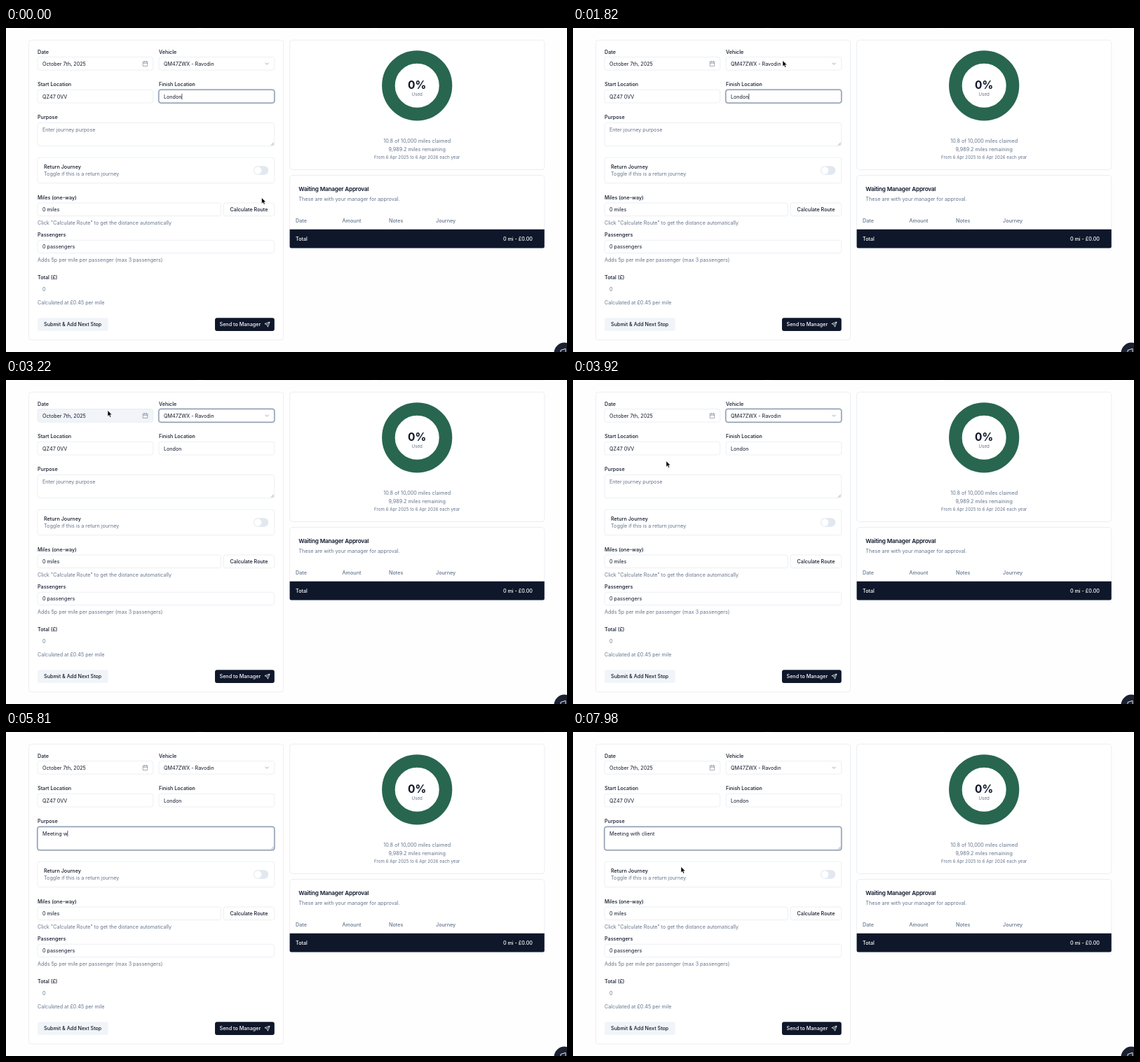
Recreate the animation shown at these times as an HTML page. Size 800x463 px, loop 8 s.

```html
<!DOCTYPE html>
<html lang="en">
<head>
<meta charset="utf-8">
<title>Journey form</title>
<style>
  html, body { margin: 0; width: 100%; height: 100%; overflow: hidden; background: #fefefe; }
  svg { display: block; width: 100vw; height: 100vh; }
  text { font: 400 7.2px Inter, "Liberation Sans", sans-serif; fill: #0f172a; white-space: pre; }
  .medium { font-weight: 500; }
  .muted { fill: #64748b; }
  .small { font-size: 6.2px; }
  .title { font-size: 8.2px; font-weight: 600; letter-spacing: -.025em; }
  .big { font-size: 15.5px; font-weight: 700; }
  .white { fill: #fff; }
  .middle { text-anchor: middle; }
  .end { text-anchor: end; }
  .box { fill: #fff; stroke: #e2e8f0; stroke-width: .7; }
  .icon { fill: none; stroke: #7b8798; stroke-width: .7; stroke-linecap: round; stroke-linejoin: round; }
</style>
</head>
<body>
<svg id="stage" viewBox="0 0 800 463" xmlns="http://www.w3.org/2000/svg"></svg>
<script>
const LOOP = 8000;
const VEHICLE = "QM47ZWX - Ravodin";
const stage = document.getElementById("stage");

// y is the vertical centre of the capitals
const text = (x, y, string, cls = "", id = "") =>
  `<text x="${x}" y="${y + 2.6}" class="${cls}" id="${id}">${string}</text>`;
const rect = (x, y, right, bottom, radius, attrs = 'class="box"') =>
  `<rect x="${x}" y="${y}" width="${right - x}" height="${bottom - y}" rx="${radius}" ${attrs}/>`;
const field = (x, y, right, bottom, id = "") =>
  rect(x, y, right, bottom, 3, `class="box" id="${id}"`);
const path = (d, attrs = 'class="icon"') => `<path d="${d}" ${attrs}/>`;
const focusRing = (id, x, y, right, bottom) => `<g id="${id}" fill="none">
  ${rect(x - .2, y - .2, right + .2, bottom + .2, 3.2, 'stroke="#c9d1dd" stroke-width="2.2"')}
  ${rect(x - .2, y - .2, right + .2, bottom + .2, 3.2, 'stroke="#8491a6" stroke-width=".9"')}</g>`;

const topEdges = [[32, 272], [282, 520], [530, 768]]
  .map(([a, b]) => path(`M${a} .3H${b}`, 'stroke="#e8ecf1" stroke-width=".7"')).join("");

const form = [
  rect(32.5, 17.3, 395.5, 445.8, 4),
  text(45, 34, "Date", "medium"),
  field(45, 41.5, 209.7, 60.2, "dateField"),
  text(52, 51, "October 7th, 2025"),
  path("M195.6 48.2h6.2v6.2h-6.2zM195.6 50.3h6.2M197.2 47.2v1.8M200.2 47.2v1.8"),
  text(218, 34, "Vehicle", "medium"),
  field(218, 41.5, 382.7, 60.2),
  text(225, 51, VEHICLE),
  path("M370 50l2.1 2.1 2.1-2.1"),
  text(45, 80.7, "Start Location", "medium"),
  field(45, 88.3, 209.7, 107),
  text(52, 98, "QZ47 0VV"),
  text(218, 80.7, "Finish Location", "medium"),
  field(218, 88.3, 382.7, 107),
  text(225, 98, "London", "", "finish"),
  text(45, 127.6, "Purpose", "medium"),
  field(45, 135.5, 382.7, 168.7),
  text(52, 145.3, "Enter journey purpose", "muted", "placeholder"),
  text(52, 145.3, "", "", "purpose"),
  path("M378.3 167.3l3.2-3.2M380.2 167.3l1.3-1.3"),
  field(45, 185.2, 382.7, 221.6),
  text(54, 198, "Return Journey", "medium"),
  text(54, 208, "Toggle if this is a return journey", "muted"),
  rect(353, 197.3, 374.3, 209.7, 6.2, 'fill="#e2e8f0"'),
  '<circle cx="359.2" cy="203.5" r="5.2" fill="#fff"/>',
  text(45, 242, "Miles (one-way)", "medium"),
  field(45, 250, 306.3, 268.6),
  text(52, 259.5, "0 miles"),
  field(310.2, 250, 382.7, 268.6),
  text(346.5, 259.5, "Calculate Route", "medium middle"),
  text(45, 278.3, 'Click "Calculate Route" to get the distance automatically', "muted"),
  text(45, 295.5, "Passengers", "medium"),
  field(45, 303.3, 382.7, 321.6),
  text(52, 312.5, "0 passengers"),
  text(45, 331, "Adds 5p per mile per passenger (max 3 passengers)", "muted"),
  text(45, 356.7, "Total (£)", "medium"),
  text(52, 373.8, "0", "muted"),
  text(45, 392.7, "Calculated at £0.45 per mile", "muted"),
  rect(45, 414.3, 145.8, 433, 3, 'fill="#f1f5f9"'),
  text(95.2, 423.8, "Submit &amp; Add Next Stop", "medium middle"),
  rect(298, 414.3, 382.8, 433, 3, 'fill="#0f172a"'),
  text(304.5, 423.8, "Send to Manager", "medium white"),
  path("M376.1 420l-7.2 2.6 3.2 1.4 1.4 3.2zM376.1 420l-4 4",
    'fill="none" stroke="#fff" stroke-width=".75" stroke-linejoin="round"')
].join("");

const summary = [
  rect(404.6, 17.3, 767.8, 202.5, 4),
  '<circle cx="586.2" cy="82.3" r="40.8" fill="none" stroke="#286650" stroke-width="18.6"/>',
  '<text x="586.2" y="87.2" class="big middle">0%</text>',
  text(586.2, 94.8, "Used", "small muted middle"),
  text(586.2, 161.3, "10.8 of 10,000 miles claimed", "muted middle"),
  text(586.2, 173.8, "9,989.2 miles remaining", "muted middle"),
  text(586.2, 184.7, "From 6 Apr 2025 to 6 Apr 2026 each year", "small muted middle"),
  rect(404.6, 210.5, 767.8, 314.6, 4),
  text(417.3, 230.2, "Waiting Manager Approval", "title"),
  text(417.3, 244.6, "These are with your manager for approval.", "muted"),
  ...[["Date", 413], ["Amount", 479.5], ["Notes", 546], ["Journey", 613]]
    .map(([name, x]) => text(x, 275, name, "muted medium")),
  path("M404.6 287.8H767.8V312.6a2 2 0 0 1-2 2H406.6a2 2 0 0 1-2-2z", 'fill="#0f172a"'),
  text(413, 301.2, "Total", "medium white"),
  text(751, 301.2, "0 mi - £0.00", "medium white end"),
  '<circle cx="796.5" cy="464.5" r="15" fill="#1b2131"/>',
  path("M791 460.5l7-2.2v6M791 460.5v4", 'fill="none" stroke="#fff" stroke-width=".9"')
].join("");

const overlay = `
  ${focusRing("finishFocus", 218, 88.3, 382.7, 107)}
  ${focusRing("vehicleFocus", 218, 41.5, 382.7, 60.2)}
  ${focusRing("purposeFocus", 45, 135.5, 382.7, 168.7)}
  ${path("", 'id="caret" stroke="#0f172a" stroke-width=".7"')}
  <g id="menu">
    ${rect(218, 63.4, 384, 86, 3, 'fill="#64748b" opacity=".16"')}
    ${rect(218, 62.2, 383.4, 84.6, 3)}
    ${rect(220, 64.3, 381.4, 82.5, 2, 'fill="#f1f5f9"')}
    ${text(225, 73.3, VEHICLE)}
    ${path("M370.6 73.4l1.7 1.8 3.8-4", 'fill="none" stroke="#334155" stroke-width=".75"')}
  </g>
  <circle id="ripple" fill="#dbe7fb" fill-opacity=".3" stroke="#7f9fdc" stroke-width="1.1"/>
  <g id="pointer">
    ${path("M0 0V8.6L2 6.8 3.3 9.8 4.8 9.1 3.5 6.2H6.2z",
      'id="arrow" fill="#000" stroke="#fff" stroke-width=".6" stroke-linejoin="round"')}
    ${path("M-1.5-4Q0-4 0-3Q0-4 1.5-4M0-3V3M-1.5 4Q0 4 0 3Q0 4 1.5 4",
      'id="beam" fill="none" stroke="#111" stroke-width=".8"')}
  </g>`;

stage.innerHTML = topEdges + form + summary + overlay;
const el = Object.fromEntries(
  [...stage.querySelectorAll("[id]")].filter(node => node.id).map(node => [node.id, node]));

// [time, x, y] of the pointer
const route = [
  [770, 364.5, 242.5], [1330, 300, 49], [1680, 299, 46.5],
  [2240, 299, 46.5], [2590, 293, 72.5], [2870, 293, 72.5],
  [3220, 145, 43.5], [3430, 134, 47], [3710, 134, 47],
  [4060, 132.3, 152.3], [7700, 132.3, 152.3], [7980, 154, 192.5]
];
const clicks = [1960, 2660, 4060];
const MENU_OPEN = 2030, MENU_CLOSE = 2800, PURPOSE_FOCUS = 4060;

const keys = [
  [4760, "M"], [5040, "e"], [5180, "e"], [5250, "t"], [5390, "i"], [5460, "n"], [5530, "g"],
  [5670, " "], [5810, "w"], [5950, "i"], [6020, "t"], [6160, "h"], [6580, " c"], [6650, "l"],
  [6860, "i"], [6930, "e"], [7070, "n"], [7210, "t"]
];

const between = (t, from, to) => t >= from && t < to;
const show = (node, visible) => node.setAttribute("visibility", visible ? "inherit" : "hidden");
const smooth = u => u * u * (3 - 2 * u);

function pointerAt(t) {
  const next = route.findIndex(point => point[0] > t);
  if (next === 0) return route[0].slice(1);
  if (next < 0) return route[route.length - 1].slice(1);
  const [t0, x0, y0] = route[next - 1];
  const [t1, x1, y1] = route[next];
  const u = smooth((t - t0) / (t1 - t0));
  return [x0 + (x1 - x0) * u, y0 + (y1 - y0) * u];
}

function drawPointer(t) {
  const [x, y] = pointerAt(t);
  const menuOpen = between(t, MENU_OPEN, MENU_CLOSE);
  const overInput = !menuOpen && (between(y, 88.3, 107) || between(y, 135.5, 168.7));
  el.pointer.setAttribute("transform", `translate(${x} ${y})`);
  show(el.pointer, !between(t, keys[0][0], 7700));
  show(el.arrow, !overInput);
  show(el.beam, overInput);
  const overDate = between(x, 45, 209.7) && between(y, 41.5, 60.2);
  el.dateField.style.fill = overDate ? "#f1f5f9" : "#fff";

  const click = clicks.find(start => between(t, start, start + 280));
  show(el.ripple, click !== undefined);
  if (click === undefined) return;
  const age = t - click;
  const grow = Math.min(age / 200, 1);
  el.ripple.setAttribute("cx", x + .4);
  el.ripple.setAttribute("cy", y + .4);
  el.ripple.setAttribute("r", 17 * (1 - (1 - grow) ** 2));
  el.ripple.setAttribute("opacity", age < 200 ? 1 : (280 - age) / 80);
}

function drawFields(t) {
  const typed = keys.filter(key => key[0] <= t);
  el.purpose.textContent = typed.map(key => key[1]).join("");
  show(el.placeholder, !typed.length);
  show(el.menu, between(t, MENU_OPEN, MENU_CLOSE));
  show(el.finishFocus, t < MENU_OPEN);
  show(el.vehicleFocus, between(t, MENU_CLOSE, PURPOSE_FOCUS));
  show(el.purposeFocus, t >= PURPOSE_FOCUS);

  const inFinish = t < MENU_OPEN;
  const lastKey = typed.length ? typed[typed.length - 1][0] : PURPOSE_FOCUS - 80;
  const blinkOn = inFinish
    ? !between(t, 210, 770) && !between(t, 1270, 1820)
    : t >= PURPOSE_FOCUS && (t - lastKey) % 980 < 490;
  show(el.caret, blinkOn);
  const x = inFinish
    ? 225 + el.finish.getComputedTextLength()
    : 52 + (typed.length ? el.purpose.getComputedTextLength() : 0);
  const y = inFinish ? 98 : 145.3;
  el.caret.setAttribute("d", `M${x + .3} ${y - 4.2}V${y + 4.2}`);
}

function frame() {
  const t = performance.now() % LOOP;
  drawFields(t);
  drawPointer(t);
  requestAnimationFrame(frame);
}
frame();
</script>
</body>
</html>
```
